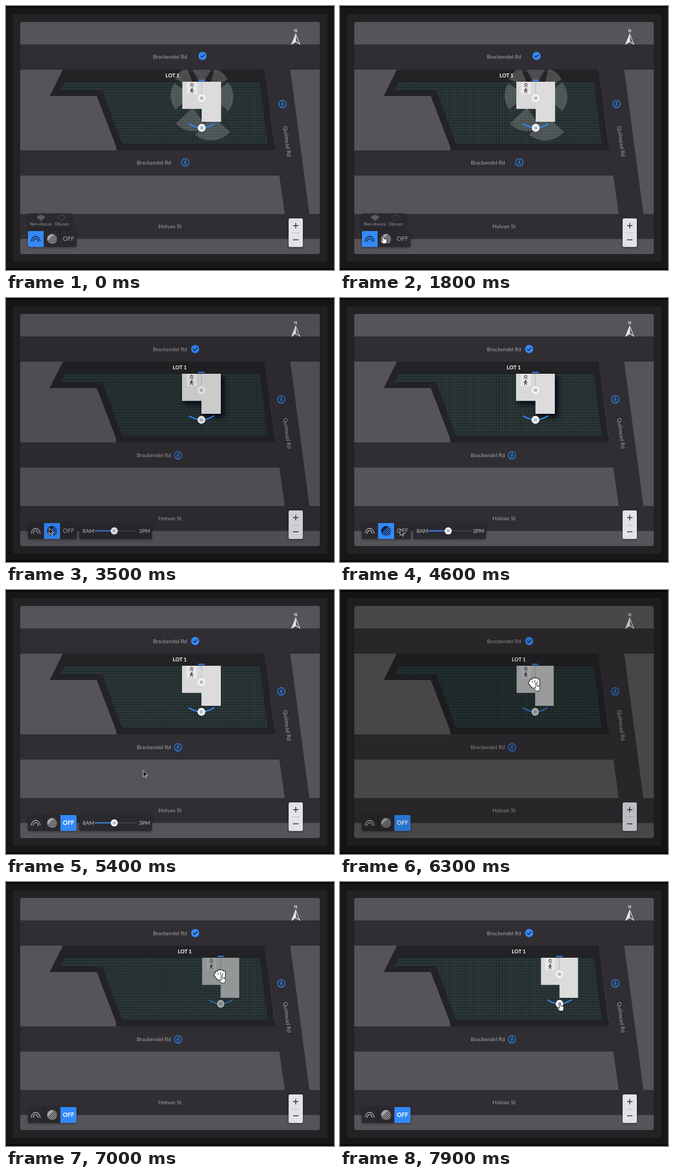
Write an HTML page that moves like this. It is 600 by 481 pixels and loops after 8 s.

```html
<!DOCTYPE html>
<html lang="en">
<head>
<meta charset="utf-8">
<title>Site planner</title>
<style>
  html, body { margin: 0; width: 100%; height: 100%; overflow: hidden; background: #070708; }
  svg { display: block; width: 100%; height: 100%; font-family: Lato, "Open Sans", sans-serif; }
  .street { font-size: 9.8px; fill: #a5a4a8; text-anchor: middle; letter-spacing: .1px; }
  .lot { font-size: 9.6px; font-weight: 700; fill: #fff; text-anchor: middle; }
  .small { font-size: 7.1px; fill: #99989d; text-anchor: middle; }
  .panel { fill: #2b292d; filter: url(#soft); }
  .line { fill: none; stroke-linecap: round; stroke-linejoin: round; }
  .blue { fill: #3489f7; }
</style>
</head>
<body>
<svg viewBox="0 0 600 481" xmlns="http://www.w3.org/2000/svg">
  <defs>
    <filter id="soft" x="-20%" y="-30%" width="140%" height="170%">
      <feDropShadow dx="0" dy="1" stdDeviation="2" flood-opacity=".45"/>
    </filter>
    <filter id="blur" x="-50%" y="-50%" width="200%" height="200%"><feGaussianBlur stdDeviation="4"/></filter>
    <pattern id="grid" width="4.9" height="5" x="100" y="138" patternUnits="userSpaceOnUse">
      <path d="M0 .5H5M.5 0V5" stroke="#1d2527" stroke-width=".9"/>
    </pattern>
    <clipPath id="screen"><rect x="26" y="29" width="548" height="423" rx="4"/></clipPath>
    <clipPath id="fanClip"><rect x="290" y="116" width="140" height="140"/></clipPath>
    <clipPath id="disc"><circle cx="84.3" cy="424.3" r="9"/></clipPath>
    <g id="walk">
      <circle cx=".6" cy="-4" r="1.1" fill="currentColor"/>
      <path class="line" stroke="currentColor" stroke-width="1.1"
        d="M.2-2.2L-.4 1L-2.4 4.4M-.4 1L1.3 2.4L2 4.6M.1-2L-2.1-.9L-2.5.8M.4-1.9L1.5-.2L3 .3"/>
    </g>
    <g id="walkPin" color="#3489f7">
      <circle r="6.8" fill="#28303d" stroke="currentColor" stroke-width="1.3"/>
      <use href="#walk" transform="scale(.9)"/>
    </g>
    <g id="checkPin">
      <circle r="7.5" class="blue"/>
      <path class="line" d="M-3.2.2L-1 2.5L3.4-2.2" stroke="#18243a" stroke-width="1.5"/>
    </g>
    <g id="knob">
      <circle r="7.2" fill="#f3f3f5"/>
      <path d="M-2-2.8V2.8M0-2.8V2.8M2-2.8V2.8" stroke="#77767c" stroke-width=".9"/>
    </g>
    <path id="fingers" class="line" d="M-6.5-4.5V2M-2.2-7V2M2.2-7V2M6.3-5V3M-9-.5L-4 6M-3 4H4V7H-2Z"/>
  </defs>

  <rect y="3" width="600" height="475" fill="#171619"/>
  <rect x="13" y="15" width="575" height="451" rx="3" fill="#232225"/>

  <g clip-path="url(#screen)">
    <rect x="26" y="29" width="548" height="423" fill="#565458"/>
    <path fill="#302e32" d="M26 70H574V116H520L555 379H574V424.500H26V379H510L500 309H26V263H493L473 116H26Z"/>
    <path fill="#232225" d="M104 116H473L493 263H202L201 255L166 164H80Z"/>
    <path d="M483 188L491 250" stroke="#47454a" stroke-width=".7"/>
    <g id="field">
      <path d="M108 138H464L478.500 251H212L176 153H100Z" fill="#2c383a"/>
      <path d="M108 138H464L478.500 251H212L176 153H100Z" fill="url(#grid)"/>
      <path d="M291.500 138V251" stroke="#182022"/>
    </g>

    <g id="roads" class="street">
      <text x="300" y="96">Brackendel Rd</text>
      <text x="270.500" y="289">Brackendel Rd</text>
      <text x="300" y="404.600">Holvan St</text>
    </g>
    <text class="street" transform="translate(511 247) rotate(82.500)">Quilmead Rd</text>

    <g id="oldPins">
      <use href="#checkPin" x="359.500" y="91"/>
      <use href="#walkPin" x="328" y="285"/>
      <use href="#walkPin" x="506" y="178.700"/>
      <g id="fans" clip-path="url(#fanClip)"></g>
    </g>
    <g id="newPins">
      <use href="#checkPin" x="346" y="93"/>
      <use href="#walkPin" x="314.700" y="286.700"/>
      <use href="#walkPin" x="503.500" y="184.700"/>
    </g>
    <text id="lotA" class="lot" x="304.500" y="130">LOT 1</text>
    <text id="lotB" class="lot" x="317.800" y="130">LOT 1</text>
    <text id="lotC" class="lot" x="327" y="130">LOT 1</text>

    <g id="house">
      <path id="shade" d="M-32 142H41V217H3V193H-32Z" fill="#050607" opacity="0" filter="url(#blur)"/>
      <g id="body">
        <rect x="-35.500" y="138" width="36" height="49.500" fill="#d9d9da"/>
        <rect y="138" width="35.500" height="73" fill="#dcdcdc"/>
        <rect x="-27" y="139" width="18.500" height="21.500" fill="#e9e9ea"/>
        <path d="M0 138V161" stroke="#aaa" stroke-width=".8"/>
        <path class="line" d="M-21 143L-18 140.800L-15 143M-21 146.500L-18 144.300L-15 146.500" stroke="#3a393d" stroke-width="1.100"/>
        <use href="#walk" x="-18" y="153.500" color="#222"/>
        <path class="line" d="M-22.500 215Q0 228.500 22.500 215" stroke="#3489f7" stroke-width="2.200"/>
        <use href="#knob" y="168"/>
        <use href="#knob" y="222"/>
      </g>
      <rect x="-6" y="134.500" width="12" height="2.200" class="blue"/>
    </g>

    <g fill="#e6e6e8">
      <text x="530" y="48" font-size="7.500" font-weight="700" text-anchor="middle">N</text>
      <path d="M530 49.500L538.500 71L530 65.500L521.500 71Z"/>
      <path d="M530.500 54L536.300 68.300L530.500 64.300Z" fill="#565458"/>
    </g>

    <g id="legend">
      <rect class="panel" x="40" y="378" width="80" height="27" rx="3"/>
      <path d="M56 385Q64 376.500 72 385L64 391.500Z" fill="#5d5b60"/>
      <path class="line" d="M94.500 385Q102 376.500 109.500 385L102 391.500Z" stroke="#626066" stroke-width=".8" stroke-dasharray="2 1.600"/>
      <text class="small" x="64" y="399.500">Non-obscure</text>
      <text class="small" x="102" y="399.500">Obscure</text>
    </g>

    <rect class="panel" x="40" y="410" width="89" height="29" rx="3"/>
    <path d="M69.500 411V438M99.500 411V424" stroke="#17161a"/>
    <path id="tab0" class="blue" d="M43 410H69V439H43Q40 439 40 436V413Q40 410 43 410Z"/>
    <rect id="tab1" class="blue" x="69.500" y="410" width="29.500" height="29"/>
    <path id="tab2" class="blue" d="M99.500 410H126Q129 410 129 413V436Q129 439 126 439H99.500Z"/>
    <g id="bow" class="line" stroke-width="1.600">
      <path d="M46 428.500C48 417 60.500 417 62.500 428.500M49.800 429C51 422 57.500 422 58.700 429"/>
    </g>
    <circle id="dot" cx="84.300" cy="424.300" r="9"/>
    <path id="hatch" clip-path="url(#disc)" stroke-width="1.300" d="M76 430L91 415M77.500 432.500L93 417M80.500 433.500L94 420M85 433L94 424"/>
    <text id="off" x="114.500" y="428.200" font-size="10.800" text-anchor="middle">OFF</text>

    <g id="slider">
      <rect class="panel" x="134" y="410" width="133" height="29" rx="3"/>
      <g font-size="9.800" fill="#c6c5c9">
        <text x="140" y="427.700">8AM</text>
        <text x="243" y="427.700">3PM</text>
      </g>
      <path d="M162 424.300H239" stroke="#4b494e" stroke-width="1.600"/>
      <path d="M162 424.300H198" stroke="#3489f7" stroke-width="2"/>
      <use href="#knob" transform="translate(198 424.300) scale(.9)"/>
    </g>

    <rect x="517" y="387" width="26" height="52" rx="3" fill="#e2e2e7" filter="url(#soft)"/>
    <path d="M525 400.300H535M530 395.300V405.300M525 426H535" stroke="#333237" stroke-width="1.500"/>
    <path d="M523 413.500H537" stroke="#b8b7bd" stroke-width=".8"/>
  </g>

  <rect id="dim" width="600" height="481" opacity="0"/>

  <g id="cursor" stroke-linejoin="round">
    <g id="grab" transform="translate(-2.500 -.500)">
      <use href="#fingers" stroke="#111" stroke-width="6.600"/>
      <use href="#fingers" stroke="#fff" stroke-width="4.500"/>
      <path d="M-4.300-4V0M0-5.500V0M4.300-4V0" stroke="#222" stroke-width=".9"/>
    </g>
    <path id="hand" fill="#fff" stroke="#111" stroke-width=".9"
      d="M-1.200.8C-1.200-.6 1.200-.6 1.200.8V5L5.200 5.800C6.600 6.100 7 6.800 6.900 8L6.300 11.600L5.300 14H-.8L-4.200 9.400C-5 8.200-3.600 7.200-2.600 8.100L-1.200 9.400Z"/>
    <path id="arrow" fill="#111" stroke="#eee" stroke-width=".9" d="M0 0V11.500L2.600 9.200L4.400 13.200L6.300 12.300L4.500 8.500H8.200Z"/>
  </g>
</svg>

<script>
const LOOP = 8000, STEP = 100;
const $ = id => document.getElementById(id);
const set = (id, name, value) => $(id).setAttribute(name, value);
const fade = (id, value) => set(id, 'opacity', value);
const ramp = (t, a, b) => Math.min(1, Math.max(0, (t - a) / (b - a)));
const ease = p => p * p * (3 - 2 * p);
const bump = (t, a, b) => Math.sin(Math.PI * ramp(t, a, b));

// Viewing sectors: apex, radius, start and end angle, obscure
const sectors = [
  [340, 163, 39, 140, 215],
  [345, 150, 40, 205, 250],
  [358, 146, 33, 240, 300],
  [372, 150, 37, 285, 335],
  [375, 165, 41, -40, 40],
  [342, 185, 43, 55, 137],
  [375, 198, 47, 42, 128],
  [340, 142, 24, 200, 330, 1],
  [376, 142, 24, 210, 340, 1],
  [382, 172, 30, -55, 50, 1],
  [334, 172, 28, 130, 220, 1]
];

function sector([x, y, r, a, b]) {
  const at = deg => {
    const q = deg * Math.PI / 180;
    return `${x + r * Math.cos(q)} ${y + r * Math.sin(q)}`;
  };
  return `M${x} ${y}L${at(a)}A${r} ${r} 0 0 1 ${at(b)}Z`;
}

$('fans').innerHTML = sectors.map(s => `<path d="${sector(s)}" ` + (s[5]
  ? 'fill="none" stroke="#77767a" stroke-width=".7" stroke-dasharray="2.500 2"/>'
  : 'fill="#c8c8cc" fill-opacity=".24"/>')).join('');

// Pointer stops: time, x, y
const stops = [
  [900, 140, 492], [1800, 79, 419], [3700, 79, 419], [4500, 110, 421],
  [4800, 110, 421], [5400, 251, 329], [5600, 251, 329], [6200, 359, 170],
  [6500, 359, 170], [7200, 403.5, 170], [7400, 403.5, 170], [7800, 402.5, 221], [8000, 402.5, 221]
];

function pointer(t) {
  const i = Math.max(1, stops.findIndex(s => s[0] >= t));
  const [t0, x0, y0] = stops[i - 1], [t1, x1, y1] = stops[i];
  const p = ease(ramp(t, t0, t1));
  return [x0 + (x1 - x0) * p, y0 + (y1 - y0) * p];
}

function draw(t) {
  const shadow = ramp(t, 2700, 3020);
  const edit = ramp(t, 5700, 6100);
  const tab = t < 2800 ? 0 : t < 4800 ? 1 : 2;

  fade('oldPins', 1 - shadow);
  fade('newPins', shadow);
  fade('legend', 1 - shadow);
  fade('lotA', 1 - shadow);
  fade('lotB', shadow * (1 - edit));
  fade('lotC', edit);
  fade('slider', shadow * (1 - edit));
  set('roads', 'transform', `translate(0 ${.6 * shadow})`);

  fade('tab0', 1 - shadow);
  fade('tab1', tab === 1 ? shadow : 0);
  fade('tab2', tab === 2 ? 1 : 0);
  set('bow', 'stroke', tab === 0 ? '#14213a' : '#a3a2a7');
  set('dot', 'fill', tab === 1 ? '#14213a' : '#a3a2a7');
  set('hatch', 'stroke', tab === 1 ? '#3489f7' : '#39373c');
  set('off', 'fill', tab === 2 ? '#fff' : '#a3a2a7');
  set('off', 'font-weight', tab === 2 ? 700 : 400);

  const drag = 44.5 * ease(ramp(t, 6500, 7200));
  const cx = 358 - .5 * shadow - .5 * edit + drag;
  set('house', 'transform', `translate(${cx} 0) scale(${1 - .045 * edit} 1)`);
  fade('body', 1 - .4 * (ramp(t, 6200, 6400) - ramp(t, 7200, 7400)));
  fade('shade', .85 * shadow * (1 - ramp(t, 4800, 5100)));

  fade('dim', .23 * (bump(t, 2700, 3600) + bump(t, 5700, 6500)));

  const hand = (t >= 1500 && t < 2800) || t >= 6100;
  set('cursor', 'transform', `translate(${pointer(t)})`);
  fade('cursor', t < 1000 ? 0 : 1);
  fade('hand', hand ? 1 : 0);
  fade('arrow', hand ? 0 : 1);
  fade('grab', t >= 6300 && t < 7300 ? 1 : 0);
}

const start = performance.now();
function tick(now) {
  const t = Math.max(0, now - start) % LOOP;
  draw(Math.floor(t / STEP) * STEP);
  requestAnimationFrame(tick);
}
draw(0);
requestAnimationFrame(tick);
</script>
</body>
</html>
```
